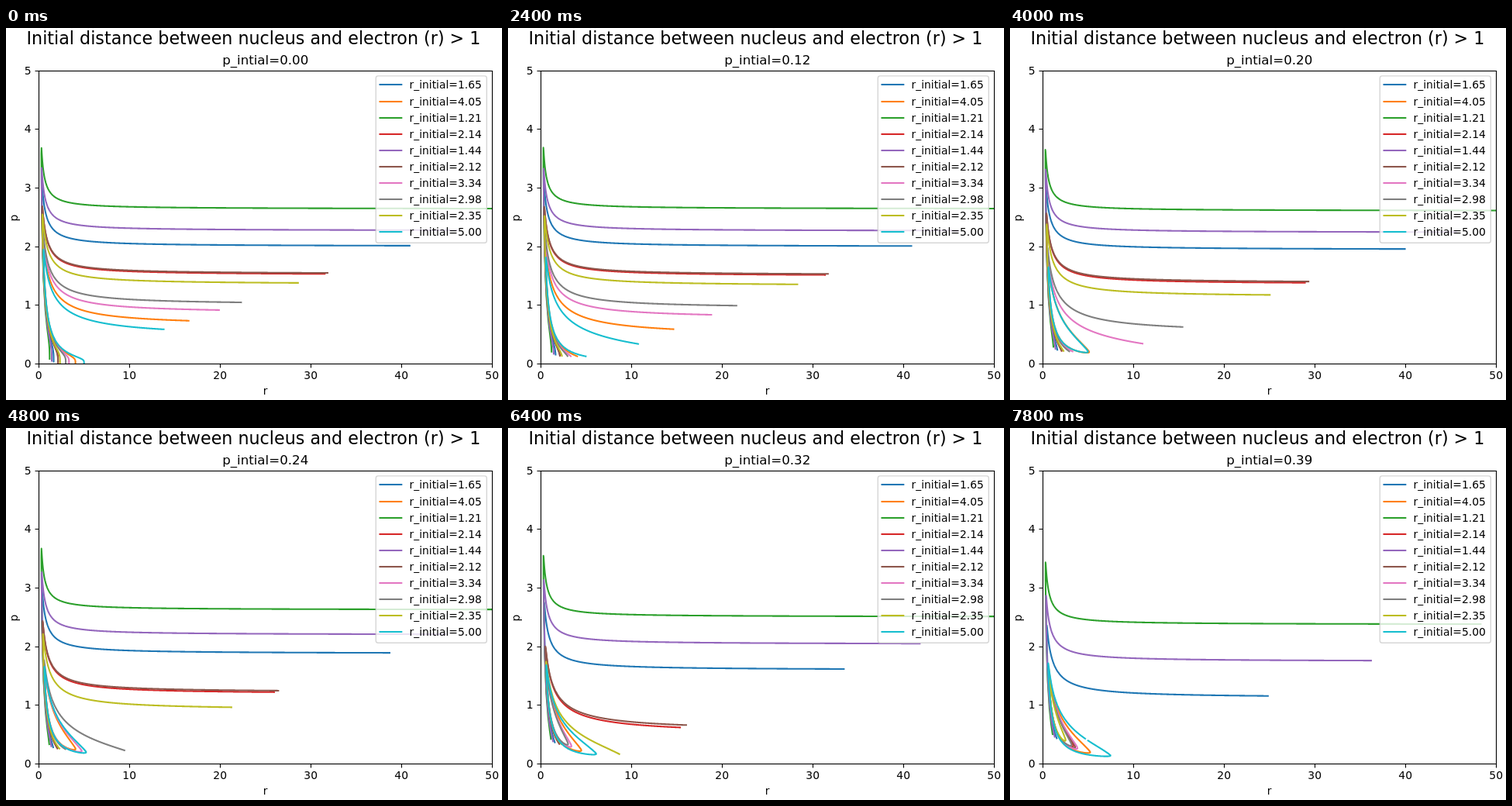
These frames come from a looping animation (640x480 px, 8 s). An HTML page:

```html
<!DOCTYPE html>
<html lang="en">
<head>
<meta charset="utf-8">
<title>Phase space</title>
<style>
  html, body { margin: 0; width: 100%; height: 100%; overflow: hidden; background: #fff; }
  svg { display: block; width: 640px; height: 480px; }
  text { font: 13.89px "DejaVu Sans", sans-serif; fill: #000; }
  .curve { fill: none; stroke-width: 2.08; stroke-linecap: square; stroke-linejoin: round; }
  .axis { fill: none; stroke: #000; stroke-width: 1.11; }
</style>
</head>
<body>
<svg viewBox="0 0 640 480">
  <defs><clipPath id="plot"><rect x="42" y="55" width="585" height="378"/></clipPath></defs>
  <g id="curves" clip-path="url(#plot)"></g>
  <rect class="axis" x="42.5" y="55.5" width="585" height="378"/>
  <g id="ticks"></g>
  <text x="319.5" y="21" text-anchor="middle" style="font-size:22.22px">Initial distance between nucleus and electron (r) &gt; 1</text>
  <text id="title" x="334.7" y="47" text-anchor="middle" style="font-size:16.67px"></text>
  <text x="334.7" y="473" text-anchor="middle">r</text>
  <text transform="translate(14.6 245) rotate(-90)" text-anchor="middle">p</text>
  <rect x="477.3" y="61.9" width="143" height="215.3" rx="2.8" fill="#fff" fill-opacity=".8" stroke="#ccc" stroke-opacity=".8" stroke-width="1.39"/>
  <g id="legend"></g>
</svg>
<script>
const LEFT = 42.2, BOTTOM = 432.8, X_UNIT = 11.7, Y_UNIT = 75.6;
const DT = 0.01, STEPS = 2000, FRAME_MS = 200, FRAMES = 40;
const series = [
  [1.65, '#1f77b4'], [4.05, '#ff7f0e'], [1.206, '#2ca02c'], [2.14, '#d62728'], [1.44, '#9467bd'],
  [2.12, '#8c564b'], [3.34, '#e377c2'], [2.98, '#7f7f7f'], [2.35, '#bcbd22'], [5, '#17becf']
];

const byId = id => document.getElementById(id);
function add(parent, tag, attrs, text = '') {
  const node = document.createElementNS('http://www.w3.org/2000/svg', tag);
  for (const key in attrs) node.setAttribute(key, attrs[key]);
  node.textContent = text;
  return parent.appendChild(node);
}

// Hamilton's equations: Coulomb attraction plus a momentum-dependent core
// H = p²/2 - 1/r + exp(5(1 - (rp)^4)) / (20 r²)
function slope(r, p) {
  const core = Math.exp(5 * (1 - (r * p) ** 4));
  return [
    p - p ** 3 * r * r * core,
    -1 / (r * r) + core / (10 * r ** 3) + r * p ** 4 * core
  ];
}

function rungeKutta(r, p) {
  const [r1, p1] = slope(r, p);
  const [r2, p2] = slope(r + r1 * DT / 2, p + p1 * DT / 2);
  const [r3, p3] = slope(r + r2 * DT / 2, p + p2 * DT / 2);
  const [r4, p4] = slope(r + r3 * DT, p + p3 * DT);
  return [
    r + DT / 6 * (r1 + 2 * r2 + 2 * r3 + r4),
    p + DT / 6 * (p1 + 2 * p2 + 2 * p3 + p4)
  ];
}

function trajectory(r, p) {
  const points = [];
  for (let i = 0; i < STEPS; i++) {
    [r, p] = rungeKutta(r, p);
    if (!isFinite(r + p) || Math.abs(r) > 60) break;
    points.push((LEFT + r * X_UNIT).toFixed(2) + ',' + (BOTTOM - p * Y_UNIT).toFixed(2));
  }
  return points.join(' ');
}

// Ticks sit on whole pixels
for (let i = 0; i <= 5; i++) {
  const x = LEFT + i * 10 * X_UNIT, y = Math.round(BOTTOM - i * Y_UNIT);
  add(byId('ticks'), 'path', { class: 'axis', d: `M${Math.round(x) + 0.5} 433.5v5M42.5 ${y + 0.5}h-5` });
  add(byId('ticks'), 'text', { x, y: 453, 'text-anchor': 'middle' }, i * 10);
  add(byId('ticks'), 'text', { x: 32.5, y: y + 5, 'text-anchor': 'end' }, i);
}

const curves = series.map(([r, stroke], i) => {
  const y = Math.round(73.45 + i * 21.1);
  add(byId('legend'), 'path', { class: 'curve', stroke, d: `M482.5 ${y}h27.8` });
  add(byId('legend'), 'text', { x: 520.5, y: y + 5 }, 'r_initial=' + r.toFixed(2));
  return add(byId('curves'), 'polyline', { class: 'curve', stroke });
});

let shown = -1;
function draw(now) {
  const frame = Math.floor(now / FRAME_MS) % FRAMES;
  if (frame !== shown) {
    shown = frame;
    const momentum = frame / 100;
    byId('title').textContent = 'p_intial=' + momentum.toFixed(2);
    series.forEach(([r], i) => curves[i].setAttribute('points', trajectory(r, momentum)));
  }
  requestAnimationFrame(() => draw(performance.now()));
}
draw(performance.now());
</script>
</body>
</html>
```
